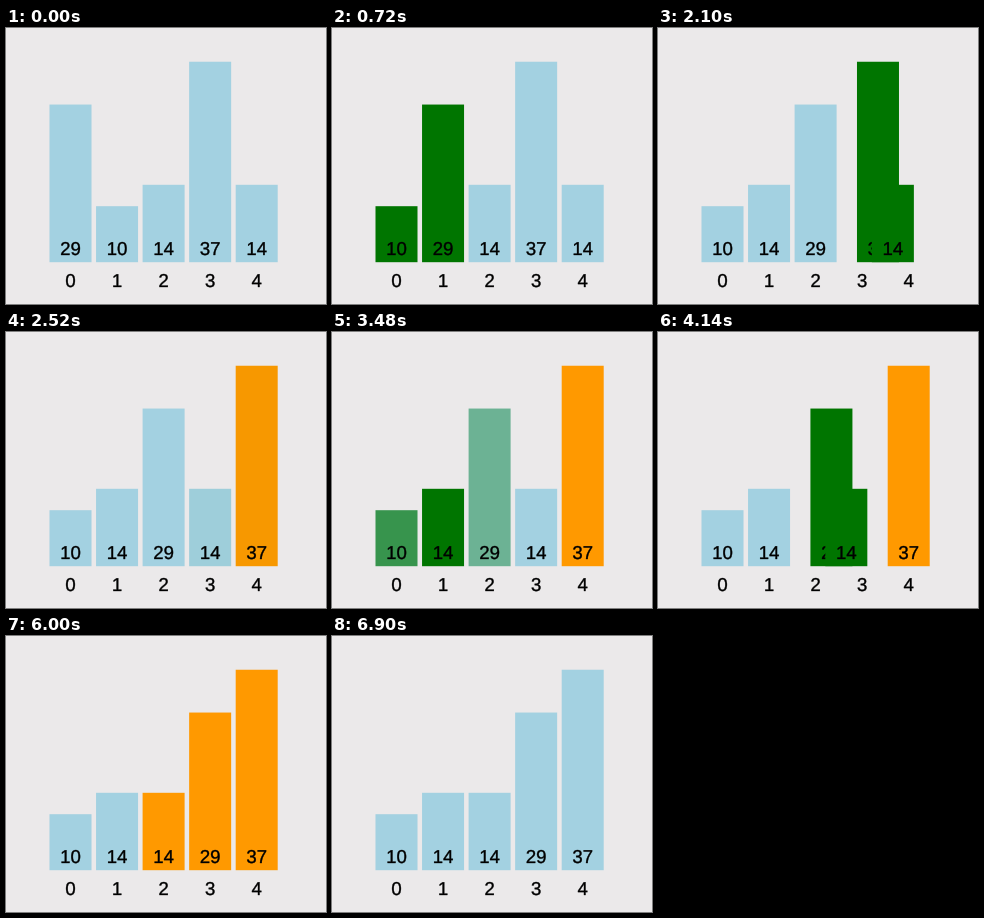
These frames come from a looping animation (320 by 276 pixels, 6.96 s). A matplotlib script:

```python
import numpy as np
import matplotlib.pyplot as plt
from matplotlib.animation import FuncAnimation
from matplotlib.patches import PathPatch, Rectangle
from matplotlib.textpath import TextPath
from matplotlib.transforms import Affine2D

W, H, DPI = 320, 276, 100
FRAMES, INTERVAL = 116, 60
VALUES = [29, 10, 14, 37, 14]
LEFT, PITCH, BAR_WIDTH, BASE = 43.5, 46.55, 42, 234.2
FONT_PX = 18.6

rgb = lambda *c: np.array(c) / 255
PLAIN, ACTIVE, DONE = rgb(163, 209, 225), rgb(0, 117, 0), rgb(255, 153, 0)

# Frame on which each step of the sort begins
STARTS = [1, 7, 13, 19, 24, 30, 35, 41, 47, 52,
          58, 63, 69, 74, 80, 85, 91, 97, 102]
EASE = [0.34, 0.97, 1.0]


def bubble_sort_states(values):
    """List of (slots, colors) arrays, indexed by bar, one per step."""
    order, states = list(range(len(values))), []

    def record(active=(), done_from=len(values)):
        slots, colors = np.zeros(len(values)), np.zeros((len(values), 3))
        for slot, bar in enumerate(order):
            slots[bar] = slot
            colors[bar] = (ACTIVE if slot in active
                           else DONE if slot >= done_from else PLAIN)
        states.append((slots, colors))

    end, swapped = len(values), True
    while swapped:
        record(done_from=end)
        swapped = False
        for j in range(end - 1):
            record((j, j + 1), end)
            if values[order[j]] > values[order[j + 1]]:
                order[j], order[j + 1] = order[j + 1], order[j]
                swapped = True
                record((j, j + 1), end)
        end -= 1
        record(done_from=end)
    record()
    return states


STATES = bubble_sort_states(VALUES)


def pose(frame):
    step = sum(start <= frame for start in STARTS)
    if step == 0:
        return STATES[0]
    age = frame - STARTS[step - 1]
    t = EASE[min(age, len(EASE) - 1)]
    return [a + (b - a) * t for a, b in zip(STATES[step - 1], STATES[step])]


fig = plt.figure(figsize=(W / DPI, H / DPI), dpi=DPI, facecolor=rgb(235, 233, 234))
ax = fig.add_axes([0, 0, 1, 1])
ax.set(xlim=(0, W), ylim=(H, 0))
ax.axis("off")


def move_label(patch, slot, y):
    x = LEFT + slot * PITCH + BAR_WIDTH / 2
    patch.set_transform(Affine2D().scale(1, -1).translate(x, y) + ax.transData)


def add_label(slot, y, text, z):
    """Number drawn as an outline, so that it can sit between pixels."""
    path = TextPath((0, 0), str(text), size=FONT_PX,
                    prop={"family": "Liberation Sans"})
    advance = 0.556 * FONT_PX * len(str(text))
    path = path.transformed(Affine2D().translate(-advance / 2, 0))
    patch = PathPatch(path, fc="black", ec="black", lw=0.25, snap=False, zorder=z)
    ax.add_artist(patch)
    move_label(patch, slot, y)
    return patch


bars, labels = [], []
for i, value in enumerate(VALUES):
    height = 5.35 * value + 2.5
    bar = Rectangle((LEFT + i * PITCH, BASE - height), BAR_WIDTH, height,
                    lw=0, snap=False, zorder=2 + 2 * i)
    bars.append(ax.add_patch(bar))
    labels.append(add_label(i, 227, value, 3 + 2 * i))
    add_label(i, 259, i, 1)


def draw(frame):
    slots, colors = pose(frame)
    for bar, label, slot, color in zip(bars, labels, slots, colors):
        bar.set_x(LEFT + slot * PITCH)
        bar.set_facecolor(color)
        move_label(label, slot, 227)
    return bars + labels


anim = FuncAnimation(fig, draw, frames=FRAMES, interval=INTERVAL,
                     repeat=True, repeat_delay=0)
plt.show()
```
